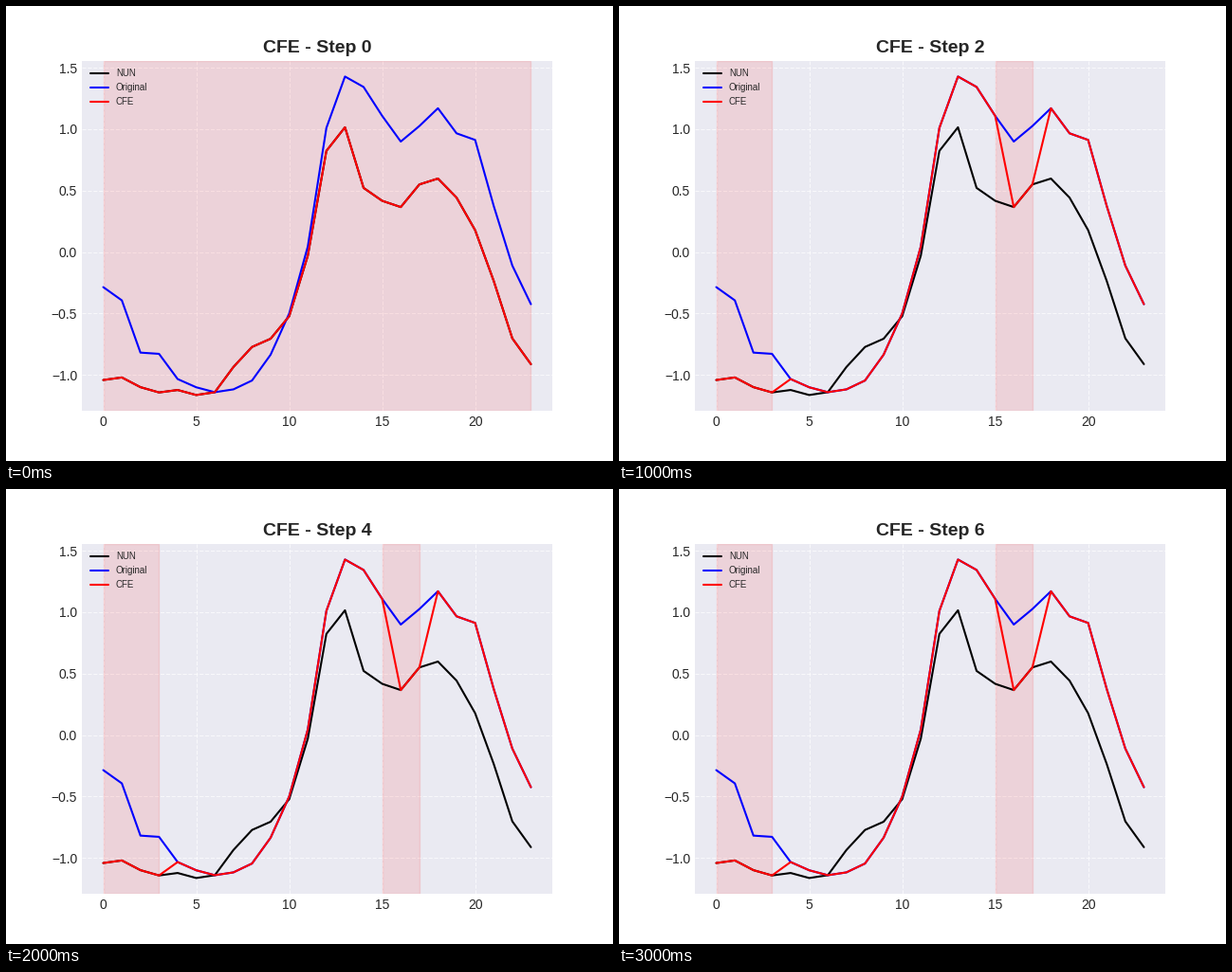
A matplotlib script for the animation above (3500 ms loop, 640 by 480 pixels).

```python
import matplotlib.pyplot as plt
import numpy as np
from matplotlib.animation import FuncAnimation

STEPS = 7
STEP_MS = 500
INK = "0.15"

plt.rcParams.update({
    "font.family": "Liberation Sans",
    "font.size": 10,
    "text.color": INK,
    "lines.solid_capstyle": "round",
})

blue_data = np.array([
    -0.285, -0.393, -0.818, -0.828, -1.033, -1.100, -1.140, -1.117,
    -1.045, -0.835, -0.500, 0.045, 1.010, 1.428, 1.343, 1.108,
    0.899, 1.025, 1.170, 0.966, 0.912, 0.375, -0.110, -0.424])
nun_data = np.array([
    -1.041, -1.020, -1.099, -1.142, -1.122, -1.163, -1.140, -0.935,
    -0.772, -0.705, -0.522, -0.030, 0.823, 1.015, 0.522, 0.417,
    0.366, 0.550, 0.598, 0.443, 0.178, -0.235, -0.702, -0.912])
x = np.arange(len(nun_data))


def replaced_ranges(step):
    """Intervals where the counterfactual follows the NUN series."""
    if step == 0:
        return [(0, 23)]
    return [(0, 3), (17, 23) if step % 2 else (15, 17)]


def counterfactual(ranges):
    mask = np.zeros(len(x), dtype=bool)
    for start, end in ranges:
        mask |= (x > start) & (x <= end)
    mask[0] = True
    return np.where(mask, nun_data, blue_data)


fig, ax = plt.subplots(figsize=(6.4, 4.8), dpi=100)


def draw(step):
    ax.clear()
    ax.set_facecolor("#EAEAF2")
    ax.set_axisbelow(True)
    ax.spines[:].set_visible(False)
    ax.tick_params(length=0, labelcolor=INK)
    ax.grid(True, color="white", linestyle="--", linewidth=0.8, alpha=0.7)

    ranges = replaced_ranges(step)
    ax.plot(x, nun_data, color="black", label="NUN")
    ax.plot(x, blue_data, color="blue", label="Original")
    ax.plot(x, counterfactual(ranges), color="red", label="CFE")
    for start, end in ranges:
        ax.axvspan(start, end, color="red", alpha=0.1)

    ax.set_title(f"CFE - Step {step}", fontsize=14, fontweight="bold")
    ax.legend(loc="upper left", fontsize=7, frameon=False)


anim = FuncAnimation(fig, draw, frames=STEPS, interval=STEP_MS,
                     init_func=lambda: None, repeat=True, repeat_delay=0)
plt.show()
```
